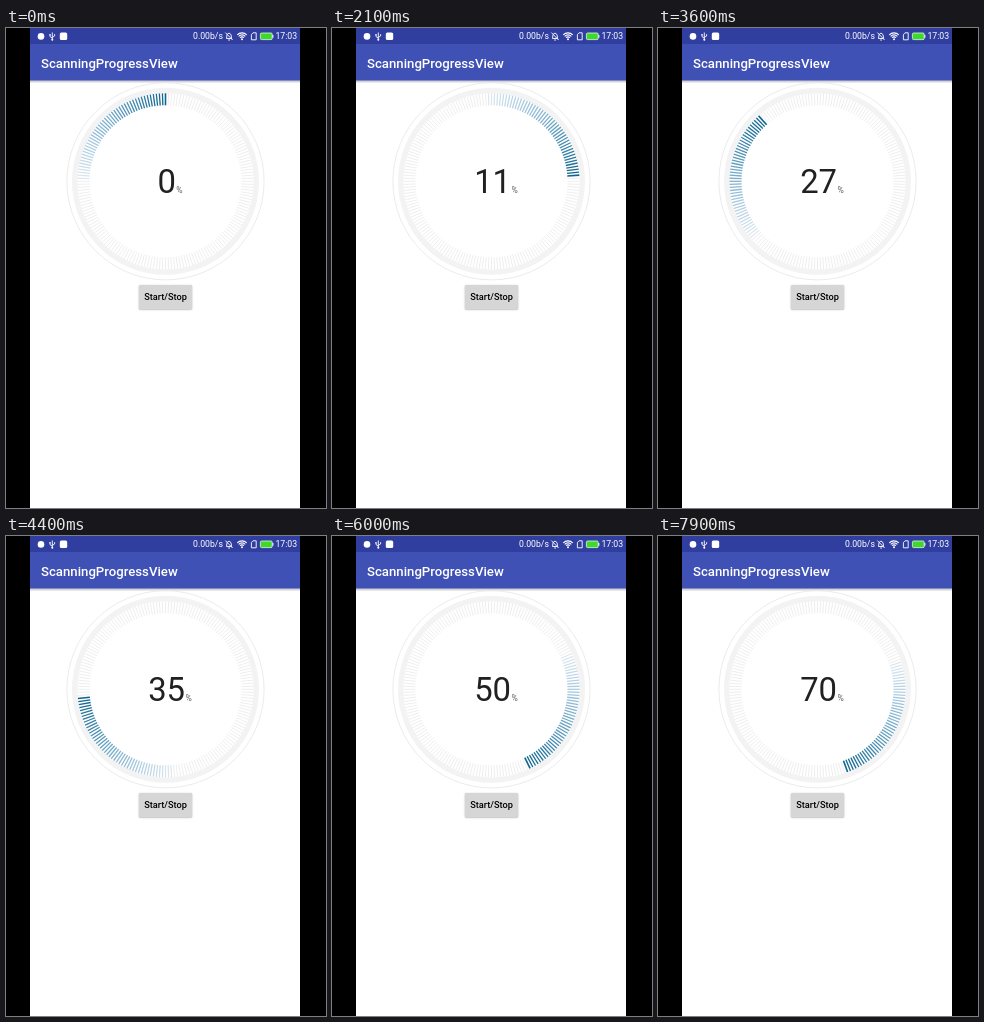
An HTML page with a canvas that plays this animation: 320 px wide and 480 px high, repeating every 8 s.

```html
<!DOCTYPE html>
<html lang="en">
<head>
<meta charset="utf-8">
<title>ScanningProgressView</title>
<style>
html, body { margin: 0; width: 100%; height: 100%; overflow: hidden; background: #000; }
canvas { display: block; width: 320px; height: 480px; }
</style>
</head>
<body>
<canvas id="stage"></canvas>
<script>
const LOOP = 8000, STEP = 100;
const CX = 159.5, CY = 153.3, TICKS = 180, TRAIL = 45;
const FONT = 'Roboto, sans-serif';
// [time ms, head angle in degrees, percent]
const KEYS = [
  [920, 0, -0.6], [1500, 218, 5], [2700, 673.5, 17], [3600, 1038.5, 27],
  [5100, 1612, 42], [6000, 1954, 50], [7900, 2680, 70]
];

const canvas = document.getElementById('stage');
const ctx = canvas.getContext('2d');
const dpr = window.devicePixelRatio || 1;
canvas.width = 320 * dpr;
canvas.height = 480 * dpr;
ctx.scale(dpr, dpr);

function rect(x, y, w, h, fill) {
  ctx.fillStyle = fill;
  ctx.fillRect(x, y, w, h);
}

function roundRect(x, y, w, h, r) {
  ctx.beginPath();
  ctx.roundRect(x, y, w, h, r);
}

function circle(x, y, r, color, width) {
  ctx.beginPath();
  ctx.arc(x, y, r, 0, Math.PI * 2);
  if (width) {
    ctx.strokeStyle = color;
    ctx.lineWidth = width;
    ctx.stroke();
  } else {
    ctx.fillStyle = color;
    ctx.fill();
  }
}

function line(...pts) {
  ctx.beginPath();
  for (let i = 0; i < pts.length; i += 2) ctx.lineTo(pts[i], pts[i + 1]);
  ctx.stroke();
}

function text(str, x, y, size, weight, color, align = 'left') {
  ctx.font = `${weight} ${size}px ${FONT}`;
  ctx.fillStyle = color;
  ctx.textAlign = align;
  ctx.fillText(str, x, y);
}

function pose(t) {
  if (t <= KEYS[0][0]) return { angle: 0, percent: 0 };
  let i = 1;
  while (i < KEYS.length - 1 && t > KEYS[i][0]) i++;
  const a = KEYS[i - 1], b = KEYS[i];
  const k = (t - a[0]) / (b[0] - a[0]);
  const mix = n => a[n] + (b[n] - a[n]) * k;
  return { angle: mix(1), percent: Math.max(0, Math.round(mix(2))) };
}

function statusBar() {
  rect(24, 0, 270, 16, '#303f9f');
  const ink = '#fff';
  circle(35, 8.4, 3.3, ink);

  // USB
  ctx.strokeStyle = ink;
  ctx.lineWidth = 0.9;
  line(46.3, 4.5, 46.3, 12);
  line(44, 6.8, 44, 8.6, 46.3, 10.2);
  line(48.6, 6.2, 48.6, 8, 46.3, 9.4);
  circle(46.3, 11.8, 1, ink);
  circle(44, 6.7, 0.8, ink);

  roundRect(53.8, 4.6, 7.4, 7.4, 1.5);
  ctx.fillStyle = ink;
  ctx.fill();

  text('0.00b/s', 187, 11.3, 8.7, 400, ink);

  // muted bell
  ctx.strokeStyle = ink;
  ctx.lineWidth = 0.9;
  line(220.5, 10.5, 221, 6.6, 223, 5, 225, 6.6, 225.6, 10.5, 220.5, 10.5);
  line(219.4, 4.6, 226.6, 12);
  line(222.2, 12, 224, 12);

  // wifi
  ctx.lineWidth = 1.1;
  for (const r of [2.7, 4.7, 6.7]) {
    ctx.beginPath();
    ctx.arc(236, 11.6, r, -Math.PI * 0.75, -Math.PI * 0.25);
    ctx.stroke();
  }
  circle(236, 11.2, 1, ink);

  // card
  ctx.strokeStyle = ink;
  ctx.lineWidth = 0.9;
  line(245.4, 11.8, 245.4, 6.6, 247, 4.8, 250.2, 4.8, 250.2, 11.8, 245.4, 11.8);

  // battery
  roundRect(254.4, 5, 11.8, 6.6, 1.2);
  ctx.fillStyle = '#3fd92c';
  ctx.fill();
  ctx.strokeStyle = '#e4f6e2';
  ctx.lineWidth = 0.8;
  ctx.stroke();
  rect(266.4, 7, 1, 2.7, ink);

  text('17:03', 269.4, 11.4, 8.7, 400, ink);
}

function chrome() {
  rect(0, 0, 320, 480, '#000');
  rect(24, 16, 270, 464, '#fff');
  const shade = ctx.createLinearGradient(0, 52.6, 0, 55.6);
  shade.addColorStop(0, 'rgba(0,0,0,.24)');
  shade.addColorStop(1, 'rgba(0,0,0,0)');
  rect(24, 52.6, 270, 3, shade);
  rect(24, 16, 270, 36.6, '#3f51b5');
  statusBar();
  text('ScanningProgressView', 35, 39.8, 13.2, 500, '#fff');
}

function tick(i) {
  const a = i * 2 * Math.PI / TICKS;
  const s = Math.sin(a), c = -Math.cos(a);
  line(CX + s * 76, CY + c * 76, CX + s * 88, CY + c * 88);
}

function dial({ angle, percent }) {
  circle(CX, CY, 98.6, '#e9e9e9', 0.9);
  circle(CX, CY, 90.8, '#f3f3f3', 5.4);

  ctx.lineWidth = 0.9;
  ctx.strokeStyle = '#ececec';
  for (let i = 0; i < TICKS; i++) tick(i);

  const head = Math.round(angle * TICKS / 360);
  for (let n = TRAIL - 1; n >= 0; n--) {
    const k = n / TRAIL;
    const fade = 1 - 0.92 * k ** 1.2;
    ctx.strokeStyle = `rgba(${14 + 60 * k},${102 + 56 * k},${142 + 76 * k},${fade})`;
    ctx.lineWidth = n ? 1.3 : 1.6;
    tick(head - n);
  }

  const label = String(percent);
  text(label, 160.6, 165, 32.8, 400, '#212121', 'center');
  const half = ctx.measureText(label).width / 2;
  text('%', 160.6 + half + 0.4, 164.8, 8.6, 400, '#606060');
}

function button(t) {
  const press = t >= 900 && t < 1400 ? 1 - (t - 900) / 500 : 0;
  const g = Math.round(214 - 18 * press);
  ctx.save();
  ctx.shadowColor = 'rgba(0,0,0,.3)';
  ctx.shadowBlur = 1.5 * dpr;
  ctx.shadowOffsetY = 0.4 * dpr;
  roundRect(132.9, 257, 53.2, 24.4, 1.4);
  ctx.fillStyle = `rgb(${g},${g},${g})`;
  ctx.fill();
  ctx.restore();
  text('Start/Stop', 159.5, 272.1, 9.2, 500, '#000', 'center');
}

function draw() {
  const t = Math.floor(performance.now() % LOOP / STEP) * STEP;
  chrome();
  dial(pose(t));
  button(t);
  requestAnimationFrame(draw);
}
draw();
</script>
</body>
</html>
```
